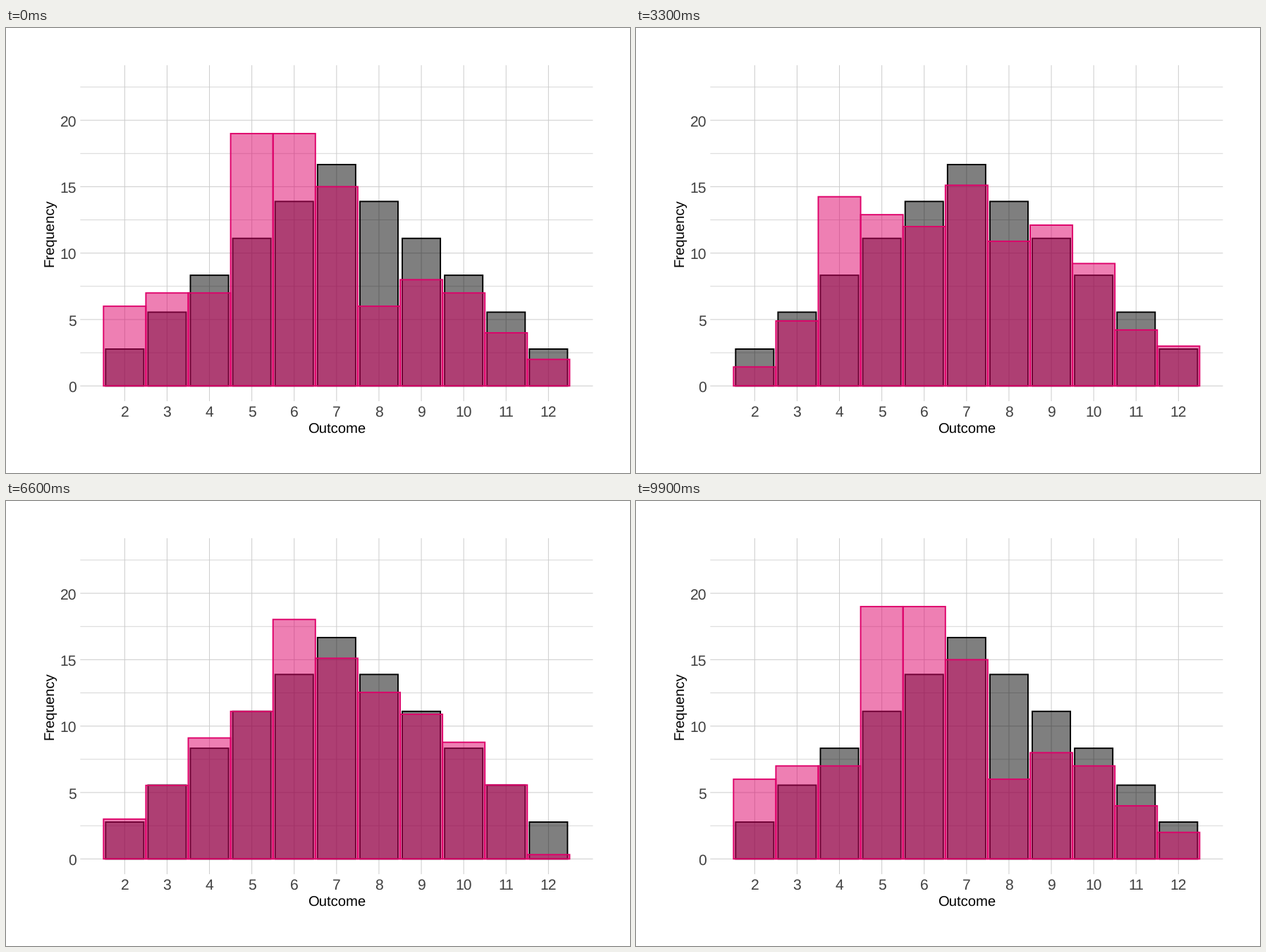
A matplotlib script that plays this animation: 885 by 632 pixels, repeating every 10 s.

```python
import matplotlib.pyplot as plt
import numpy as np
from matplotlib.animation import FuncAnimation
from matplotlib.colors import to_rgba
from matplotlib.patches import Rectangle

W, H, DPI = 885, 632, 100
PX = 72 / DPI  # points per pixel
PINK, GRID = "#de0069", "#cccccc"
PANEL = (105.3, 832.4, 52.8, 530.0)  # left, right, top, bottom
FRAMES = 100

plt.rcParams.update({"font.family": "Liberation Sans", "text.hinting": "none"})

# Counts per outcome (2..12) for each batch of 100 rolls of two dice
ROLLS = np.array([
    [6, 7, 7, 19, 19, 15, 6, 8, 7, 4, 2],
    [1, 3, 8, 12, 11, 20, 15, 12, 7, 7, 4],
    [1, 4, 4, 15, 12, 19, 12, 8, 11, 10, 4],
    [1, 5, 15, 13, 12, 15, 11, 12, 9, 4, 3],
    [5, 4, 8, 12, 12, 16, 10, 13, 11, 6, 3],
    [2, 6, 9, 10, 14, 20, 11, 13, 7, 4, 4],
    [3, 10, 10, 12, 10, 16, 17, 10, 7, 2, 3],
    [3, 5, 9, 11, 19, 15, 12, 11, 9, 6, 0],
    [4, 6, 10, 13, 16, 14, 12, 11, 12, 1, 1],
    [0, 7, 11, 13, 11, 14, 23, 8, 5, 3, 5],
])
STARTS = [0, 10, 20, 30, 40, 49, 59, 69, 79, 89, 99]
OUTCOMES = np.arange(2, 13)
EXPECTED = (6 - abs(OUTCOMES - 7)) / 36 * 100


def sx(v):
    return 138.3 + (v - 1.5) * 60.1


def sy(v):
    return 508.35 - v * 18.865


def cubic_in_out(t):
    return 4 * t**3 if t < 0.5 else 1 - 4 * (1 - t) ** 3


def heights(frame):
    i = min(np.searchsorted(STARTS, frame, side="right") - 1, len(ROLLS) - 1)
    t = (frame - STARTS[i]) / (STARTS[i + 1] - STARTS[i])
    a, b = ROLLS[i], ROLLS[(i + 1) % len(ROLLS)]
    return a + (b - a) * cubic_in_out(t)


fig = plt.figure(figsize=(W / DPI, H / DPI), dpi=DPI, facecolor="white")
ax = fig.add_axes([0, 0, 1, 1])
ax.set(xlim=(0, W), ylim=(H, 0))
ax.axis("off")


def line(xs, ys, width):
    ax.plot(xs, ys, color=GRID, lw=width * PX, snap=False,
            solid_capstyle="butt", zorder=1)


def label(x, y, text, size, color, **kw):
    ax.text(x, y, text, fontsize=size * PX, color=color, va="baseline", **kw)


def bars(values, width, color, z):
    made = []
    for k, v in zip(OUTCOMES, values):
        bar = Rectangle((sx(k - width / 2), sy(0)), sx(width) - sx(0), sy(v) - sy(0),
                        facecolor=to_rgba(color, 0.5), edgecolor=color,
                        lw=1.9 * PX, joinstyle="miter", snap=False, zorder=z)
        made.append(ax.add_patch(bar))
    return made


left, right, top, bottom = PANEL
for v in np.arange(2.5, 23, 5):
    line([left, right], [sy(v)] * 2, 0.8)
for v in range(0, 21, 5):
    line([left, right], [sy(v)] * 2, 1)
    label(100, sy(v) + 8.4, str(v), 21.2, "#404040", ha="right")
for k in OUTCOMES:
    line([sx(k)] * 2, [top, bottom], 1)
    label(sx(k), 551.5, str(k), 21.2, "#404040", ha="center")
label((left + right) / 2, 575.5, "Outcome", 20.3, "black", ha="center")
label(67, (top + bottom) / 2, "Frequency", 20.3, "black", ha="center",
      rotation=90, rotation_mode="anchor")

bars(EXPECTED, 0.9, "black", 2)
rolled = bars(ROLLS[0], 1, PINK, 3)


def update(frame):
    for bar, v in zip(rolled, heights(frame)):
        bar.set_height(sy(v) - sy(0))
    return rolled


anim = FuncAnimation(fig, update, frames=FRAMES, interval=100,
                     repeat=True, repeat_delay=0, blit=False)
plt.show()
```
